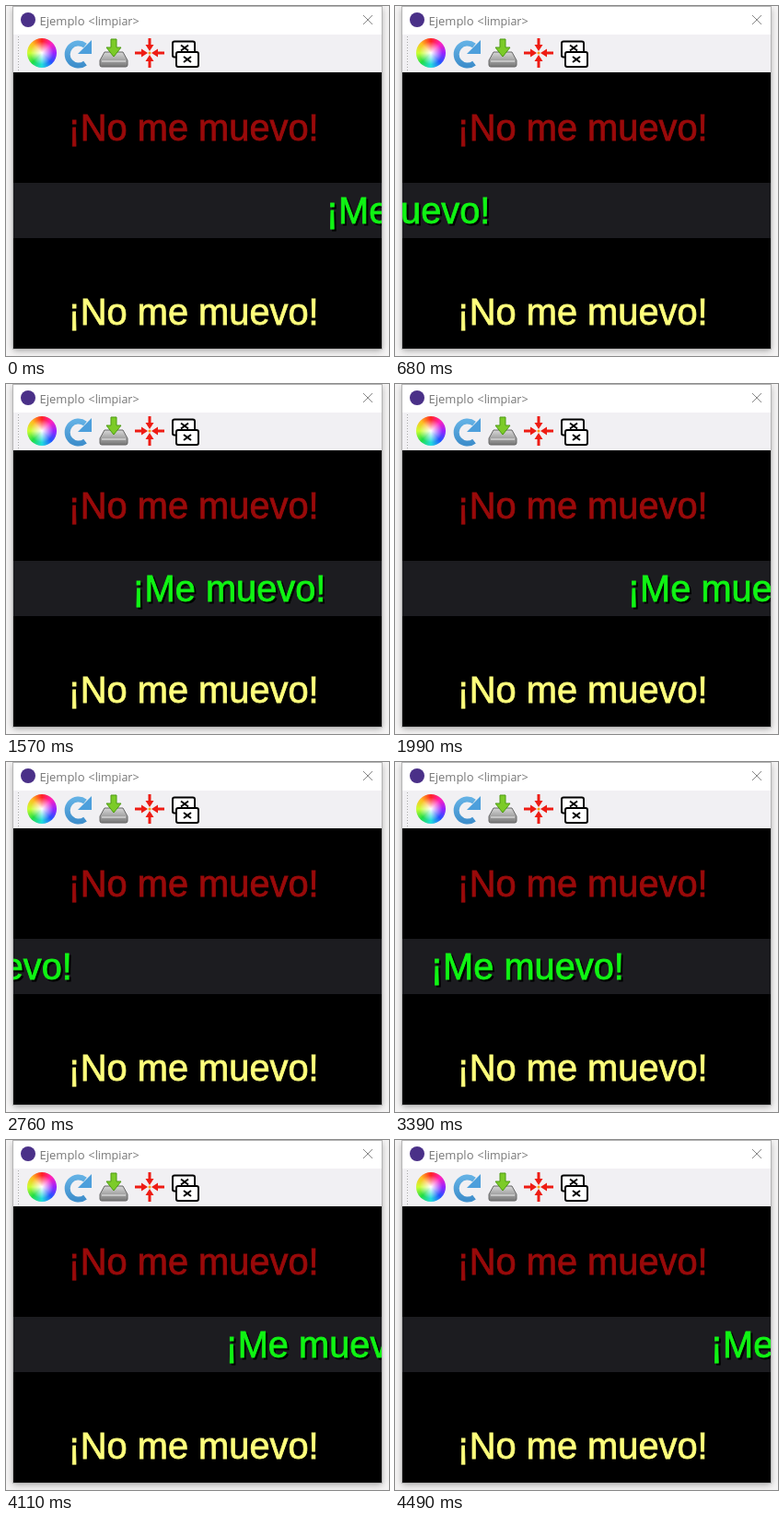
Animation of 416x380 px, one loop 4.53 s. Source, as an HTML page:

```html
<!DOCTYPE html>
<html lang="es">
<head>
<meta charset="utf-8">
<style>
html, body { margin: 0; width: 100%; height: 100%; overflow: hidden; background: #f5f4f4; }
#win { position: absolute; left: 8px; top: 1px; width: 400px; height: 371px;
  background: #f1f0f3; box-shadow: 0 0 0 1px #b4b4b4, 0 2px 7px rgba(60, 60, 60, .45); }
#wheel { position: absolute; left: 23px; top: 35px; width: 32px; height: 32px; border-radius: 50%;
  background: radial-gradient(#fff, #fff0 55%),
    conic-gradient(#f22, #f2b, #92f, #25f, #2dd, #2d4, #cf3, #fb2, #f22); }
svg { position: absolute; left: 0; top: 0; }
.big { font: 39.8px "Liberation Sans", Arial, sans-serif; stroke-width: .8; }
.title { font: 13px "Open Sans", sans-serif; fill: #777; }
.red { fill: #990a0a; stroke: #990a0a; }
.green { fill: #10f414; stroke: #10f414; }
.yellow { fill: #ffff7c; stroke: #ffff7c; }
</style>
</head>
<body>
<div id="win"></div>
<svg width="416" height="380" viewBox="0 0 416 380">
  <defs>
    <clipPath id="canvas"><rect x="8" y="72" width="400" height="300"/></clipPath>
    <linearGradient id="blue" x2="0" y2="1">
      <stop stop-color="#62b0e4"/><stop offset="1" stop-color="#3f8fcc"/>
    </linearGradient>
    <linearGradient id="tray" x2="0" y2="1">
      <stop stop-color="#d8d8d8"/><stop offset="1" stop-color="#777"/>
    </linearGradient>
    <path id="dart" d="M156 49l-4.500-7h3v-7h3v7h3z"/>
  </defs>

  <!-- title bar -->
  <rect x="8" y="1" width="400" height="30" fill="#fff"/>
  <circle cx="24" cy="15" r="8" fill="#4a3088"/>
  <text class="title" x="36.500" y="20.500">Ejemplo</text>
  <text class="title" x="89.500" y="20.500" style="font-size:12.500px">&lt;limpiar&gt;</text>
  <path d="M388 10l10 10m0-10l-10 10" stroke="#888"/>

  <!-- toolbar -->
  <path d="M13.500 33v38" stroke="#aaa" stroke-dasharray="1 2"/>
  <path d="M86 62A12 12 0 1 1 86 43" fill="none" stroke="url(#blue)" stroke-width="6"/>
  <path d="M93 37v15h-15z" fill="#4d9fdc"/>
  <path d="M107 50h20l5 9v5q0 2-2 2h-26q-2 0-2-2v-5z" fill="url(#tray)" stroke="#666"/>
  <path d="M104 60h26" stroke="#eee"/>
  <path d="M114 36h6v9h5l-8 10-8-10h5z" fill="#7ccb28" stroke="#4c9a12"/>
  <g fill="#ee1c14">
    <use href="#dart"/>
    <use href="#dart" transform="rotate(90 156 51)"/>
    <use href="#dart" transform="rotate(180 156 51)"/>
    <use href="#dart" transform="rotate(270 156 51)"/>
  </g>
  <circle cx="156" cy="51" r="1.500" fill="#f90"/>
  <g fill="#fff" stroke="#000" stroke-width="2">
    <rect x="181" y="38.500" width="24" height="17" rx="2"/>
    <path d="M190 42.500l8 6m0-6l-8 6"/>
    <rect x="185" y="50" width="24" height="16" rx="2"/>
    <path d="M193 55l8 6m0-6l-8 6"/>
  </g>

  <!-- sketch -->
  <rect x="8" y="72" width="400" height="300"/>
  <rect x="8" y="192" width="400" height="60" fill="#1c1c20"/>
  <g class="big">
    <text class="red" x="67.600" y="145.500">¡No me muevo!</text>
    <g clip-path="url(#canvas)">
      <g id="mover">
        <text x="2" y="237.500" stroke="#000">¡Me muevo!</text>
        <text class="green" y="235.500">¡Me muevo!</text>
      </g>
    </g>
    <text class="yellow" x="67.600" y="345.500">¡No me muevo!</text>
  </g>
</svg>
<div id="wheel"></div>
<script>
const LOOP = 4530, STEPS = 104, LAP = 605, EXIT = 408;
// [time, distance] points along the continuous, unwrapped path
const path = [[130, 350], [1190, 640], [1990, 860], [2760, 1074], [3390, 1251], [3820, 1371], [4490, 1555]];
const mover = document.getElementById('mover');

const stepTime = k => 130 + 10 * Math.floor(4.2375 * k + 0.4);

function tick(t) {
  let k = 0;
  while (k + 1 < STEPS && stepTime(k + 1) <= t) k++;
  return stepTime(k);
}

function distance(t) {
  const i = Math.max(1, path.findIndex(p => p[0] >= t));
  const [t0, x0] = path[i - 1], [t1, x1] = path[i];
  return x0 + (x1 - x0) * (t - t0) / (t1 - t0);
}

function draw(now) {
  let x = distance(tick(now % LOOP));
  while (x > EXIT) x -= LAP;
  mover.setAttribute('transform', `translate(${x - 2.2})`);
  requestAnimationFrame(draw);
}
draw(performance.now());
</script>
</body>
</html>
```
